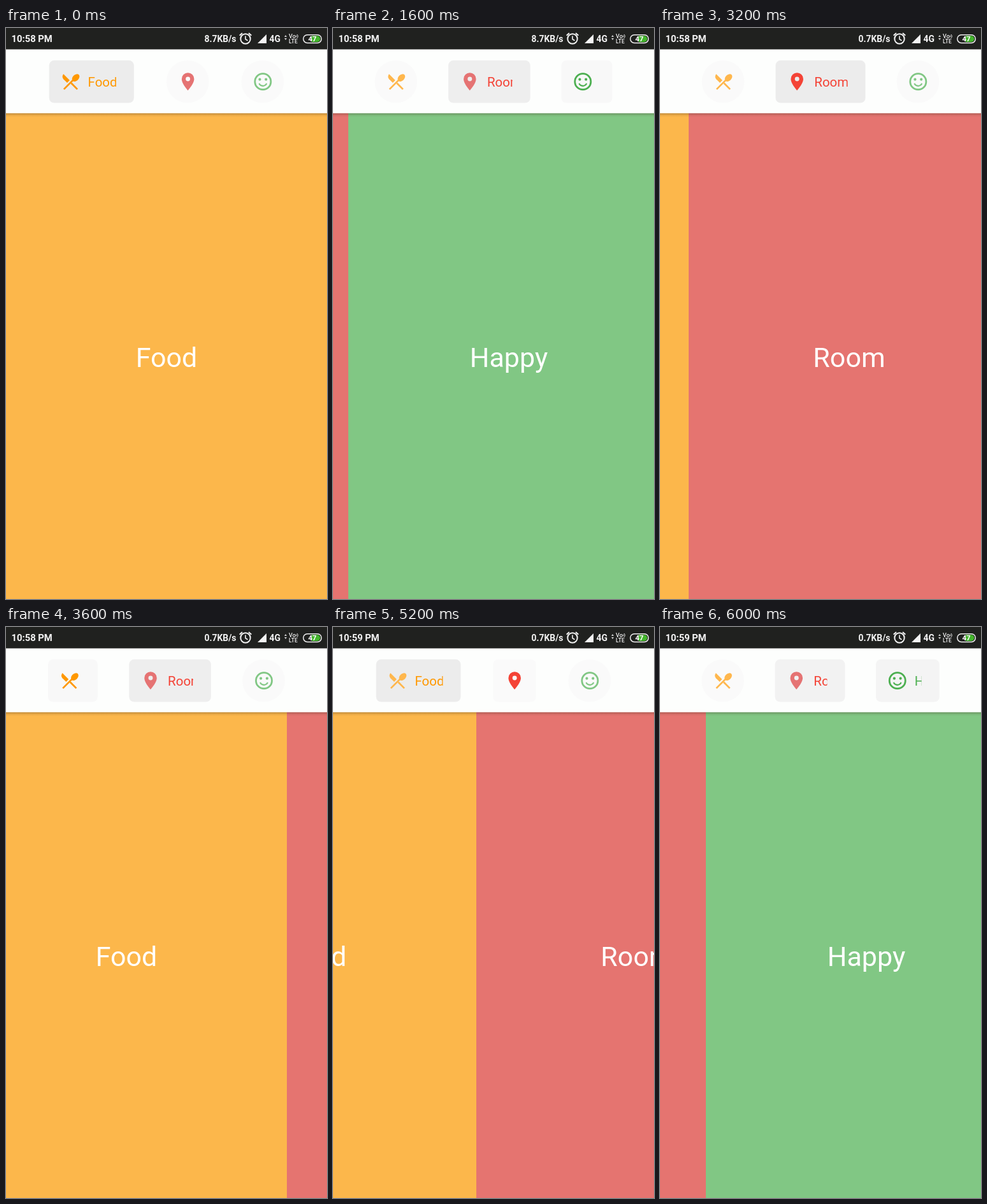
Write an HTML page with a canvas that moves like this. It is 504x896 px and loops after 6.1 s.

```html
<!DOCTYPE html>
<html lang="en">
<head>
<meta charset="utf-8">
<title>Swipe tabs</title>
<style>
html, body { margin: 0; width: 100%; height: 100%; overflow: hidden; background: #fdfefd; }
canvas { display: block; width: 100vw; height: 100vh; }
</style>
</head>
<body>
<canvas id="stage" width="504" height="896"></canvas>
<script>
const W = 504, H = 896, LOOP = 6100, STEP = 100;
const ctx = document.getElementById('stage').getContext('2d');
const FONT = 'Roboto, "Noto Sans", sans-serif';

// Navigation metrics
const NAV_TOP = 33.5, NAV_BOTTOM = 133.7, SIDE = 16.7, TAB = 66.7, TAB_Y = 50.8;
const ICON = 33.4, TEXT_X = 60.8, TEXT_END = 28, TEXT_GAP = 20.4, LABEL_SIZE = 20.5, SWITCH_MS = 500;

const tabs = [
  { name: 'Food', icon: drawCutlery, page: '#fcb74b', idle: '#ffb74d', active: '#ff9800' },
  { name: 'Room', icon: drawPin, page: '#e57470', idle: '#e57373', active: '#f44336' },
  { name: 'Happy', icon: drawSmile, page: '#81c784', idle: '#81c784', active: '#4caf50' }
];

// A finger drags from `start`, passes half a page at `cross`, then the page settles at rate `tau`
const swipes = [
  { from: 0, to: 1, start: 620, cross: 770, tau: 71 },
  { from: 1, to: 2, start: 1330, cross: 1470, tau: 55 },
  { from: 2, to: 1, start: 2240, cross: 2520, tau: 107 },
  { from: 1, to: 0, start: 3000, cross: 3470, tau: 94 },
  { from: 0, to: 1, start: 4300, cross: 5177, tau: 200 },
  { from: 1, to: 2, start: 5600, cross: 5777, tau: 170 }
];

const lerp = (a, b, k) => a + (b - a) * k;

function progress({ start, cross, tau }, t) {
  if (t <= start) return 0;
  if (t < cross) return .5 * ((t - start) / (cross - start)) ** 2;
  return 1 - .5 * Math.exp((cross - t) / tau);
}

const position = t => swipes.reduce((sum, s) => sum + (s.to - s.from) * progress(s, t), 0);

function selection(t) {
  const last = swipes.filter(s => s.cross <= t).pop();
  if (!last) return { active: 0, open: [1, 0, 0] };
  const k = Math.min(1, (t - last.cross) / SWITCH_MS);
  const open = [0, 0, 0];
  open[last.to] = k * k * (3 - 2 * k);
  open[last.from] = 1 - open[last.to];
  return { active: last.to, open };
}

function text(str, x, y, size, color, weight = 400, align = 'left') {
  ctx.font = `${weight} ${size}px ${FONT}`;
  ctx.textAlign = align;
  ctx.fillStyle = color;
  ctx.fillText(str, x, y);
}

function roundRect(x, y, w, h, r) {
  ctx.beginPath();
  ctx.roundRect(x, y, w, h, r);
}

function trace(points) {
  ctx.beginPath();
  points.forEach(([x, y]) => ctx.lineTo(x, y));
}

function polygon(...points) {
  trace(points);
  ctx.fill();
}

function line(...points) {
  trace(points);
  ctx.stroke();
}

function arc(x, y, r, from = 0, to = Math.PI * 2) {
  ctx.beginPath();
  ctx.arc(x, y, r, from, to);
}

// Icons are drawn on a 24 unit grid in the current colour
function drawCutlery() {
  ctx.lineWidth = 2;
  line([4.4, 20.6], [15, 10]);
  line([12.7, 13.7], [19.6, 20.6]);
  ctx.beginPath();
  ctx.moveTo(3.9, 3.5);
  ctx.lineTo(10.9, 10.5);
  ctx.lineTo(8.1, 13.3);
  ctx.lineTo(3.9, 9.2);
  ctx.quadraticCurveTo(1.6, 6.4, 3.9, 3.5);
  ctx.fill();
  ctx.beginPath();
  ctx.ellipse(17.8, 7.7, 4.9, 3.4, -Math.PI / 4, 0, Math.PI * 2);
  ctx.fill();
}

function drawPin() {
  arc(12, 9, 7, Math.PI, 0);
  ctx.bezierCurveTo(19, 14.25, 12, 22, 12, 22);
  ctx.bezierCurveTo(12, 22, 5, 14.25, 5, 9);
  ctx.moveTo(14.5, 9);
  ctx.arc(12, 9, 2.5, 0, Math.PI * 2);
  ctx.fill('evenodd');
}

function drawSmile() {
  ctx.lineWidth = 2;
  arc(12, 12, 9);
  ctx.stroke();
  for (const x of [8.5, 15.5]) {
    arc(x, 9.5, 1.5);
    ctx.fill();
  }
  ctx.lineWidth = 1.5;
  arc(12, 12.1, 4.7, .42, Math.PI - .42);
  ctx.stroke();
}

function drawPages(pos) {
  tabs.forEach((tab, i) => {
    const x = Math.round((i - pos) * W);
    if (x <= -W || x >= W) return;
    ctx.fillStyle = tab.page;
    ctx.fillRect(x, NAV_TOP, W, H - NAV_TOP);
    text(tab.name, x + W / 2, 532, 43, '#fff', 400, 'center');
  });
}

function drawTab(tab, x, w, open, active) {
  const shade = Math.round(lerp(250, 236, open));
  ctx.fillStyle = `rgb(${shade},${shade},${shade})`;
  roundRect(x, TAB_Y, w, TAB, active || open > 0 ? 8 : TAB / 2);
  ctx.fill();

  const pad = (TAB - ICON) / 2;
  ctx.save();
  ctx.translate(x + pad + .4, TAB_Y + pad);
  ctx.scale(ICON / 24, ICON / 24);
  ctx.fillStyle = ctx.strokeStyle = active ? tab.active : tab.idle;
  tab.icon();
  ctx.restore();

  const room = w - TEXT_END - TEXT_X;
  if (room <= 0) return;
  ctx.save();
  ctx.beginPath();
  ctx.rect(x + TEXT_X, TAB_Y, room, TAB);
  ctx.clip();
  text(tab.name, x + TEXT_X, 91.7, LABEL_SIZE, tab.active);
  ctx.restore();
}

function drawNav(t) {
  const shadow = ctx.createLinearGradient(0, NAV_BOTTOM, 0, NAV_BOTTOM + 6);
  shadow.addColorStop(0, 'rgba(60,40,20,.36)');
  shadow.addColorStop(.4, 'rgba(60,40,20,.13)');
  shadow.addColorStop(1, 'rgba(60,40,20,0)');
  ctx.fillStyle = shadow;
  ctx.fillRect(0, NAV_BOTTOM, W, 6);
  ctx.fillStyle = '#fdfefd';
  ctx.fillRect(0, 0, W, NAV_BOTTOM);

  const { active, open } = selection(t);
  ctx.font = `400 ${LABEL_SIZE}px ${FONT}`;
  const widths = tabs.map((tab, i) =>
    TAB + (TEXT_GAP + ctx.measureText(tab.name).width) * open[i]);
  const gap = (W - 2 * SIDE - widths.reduce((a, b) => a + b)) / 4;
  let x = SIDE + gap;
  tabs.forEach((tab, i) => {
    drawTab(tab, x, widths[i], open[i], i === active);
    x += widths[i] + gap;
  });
}

function drawAlarm(x, y) {
  ctx.strokeStyle = '#f2f2f2';
  ctx.lineWidth = 2;
  arc(x, y, 7.7);
  ctx.stroke();
  for (const side of [-1, 1]) line([x + side * 9.3, y - 5.3], [x + side * 5, y - 9]);
  ctx.lineWidth = 1.6;
  line([x, y - 4.5], [x, y + .5], [x + 3.5, y + 2.7]);
}

function drawBattery() {
  ctx.fillStyle = '#43b52c';
  roundRect(480, 12.3, 13.5, 9.6, [0, 4.8, 4.8, 0]);
  ctx.fill();
  ctx.strokeStyle = '#eee';
  ctx.lineWidth = 1.5;
  roundRect(466.8, 10.7, 28.5, 12.8, 6.4);
  ctx.stroke();
  text('47', 481, 21.2, 11.5, '#fff', 700, 'center');
}

function drawStatus(t) {
  const white = '#f4f4f4';
  ctx.fillStyle = '#20211f';
  ctx.fillRect(0, 0, W, NAV_TOP);
  text(t < 4000 ? '10:58 PM' : '10:59 PM', 8.5, 22.3, 14.8, white, 600);
  text(t < 3200 ? '8.7KB/s' : '0.7KB/s', 311.5, 22, 13.9, white, 600);
  drawAlarm(376, 17);
  ctx.fillStyle = white;
  polygon([395, 24], [409, 10], [409, 24]);
  text('4G', 413.5, 22, 13.9, white, 600);
  ctx.fillStyle = '#ccc';
  polygon([437, 14], [439, 11], [441, 14]);
  polygon([437, 16], [441, 16], [439, 19]);
  text('Vo', 444, 16.3, 9, white, 500);
  text('LTE', 444, 24.3, 8.5, white, 500);
  ctx.strokeStyle = white;
  ctx.lineWidth = 1;
  for (const r of [2, 4.2]) {
    arc(454, 13, r, -.8, .8);
    ctx.stroke();
  }
  drawBattery();
}

function draw(now) {
  const t = Math.floor(now % LOOP / STEP) * STEP;
  drawPages(position(t));
  drawNav(t);
  drawStatus(t);
}

let start;
function frame(now) {
  start ??= now;
  draw(now - start);
  requestAnimationFrame(frame);
}
draw(0);
requestAnimationFrame(frame);
</script>
</body>
</html>
```
